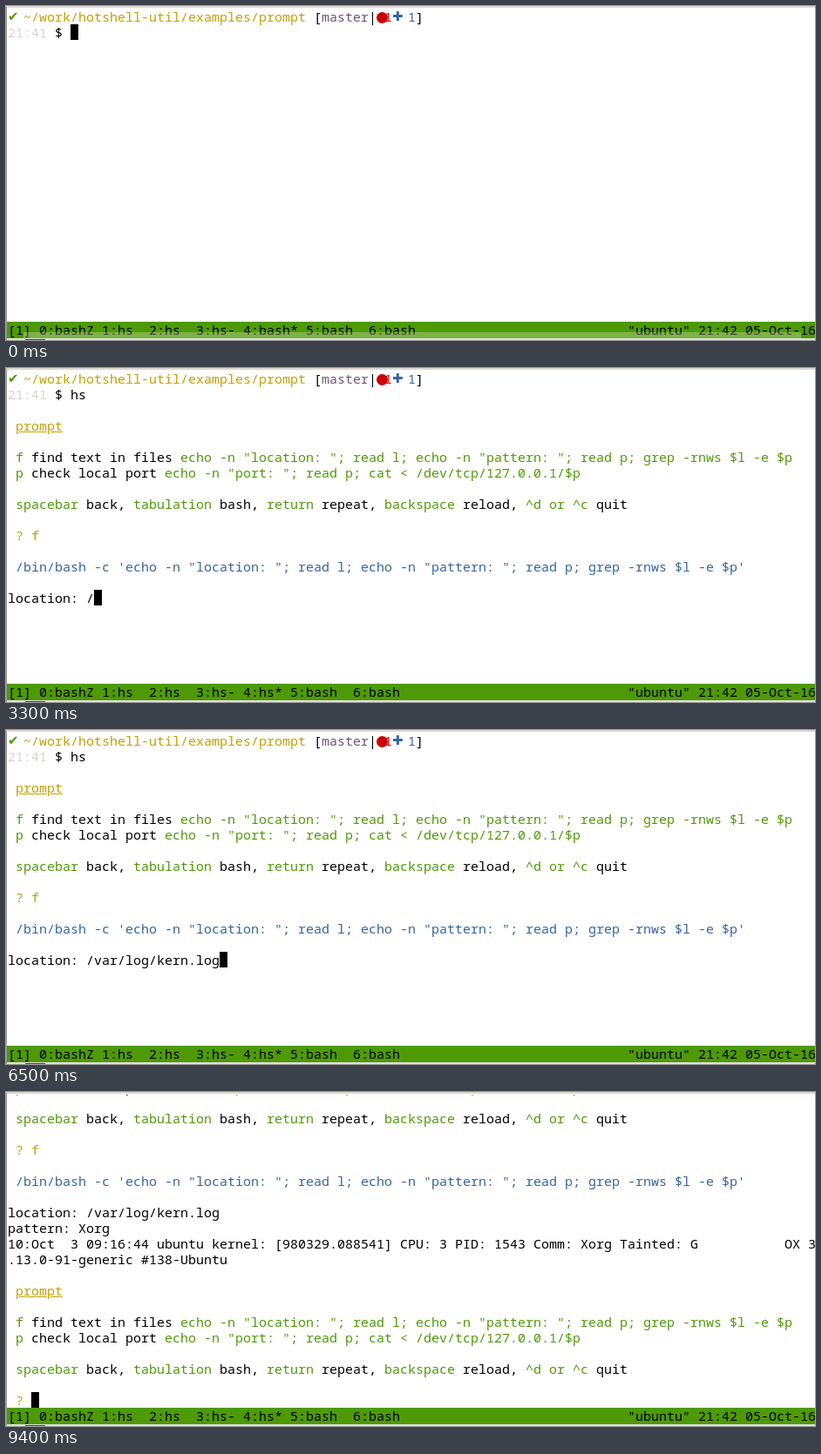
An HTML page for the animation above (9.5 s loop, 928 px wide and 384 px high).

```html
<!DOCTYPE html>
<html lang="en">
<head>
<meta charset="utf-8">
<title>Terminal menu</title>
<style>
  html, body { margin: 0; width: 100%; height: 100%; overflow: hidden; background: #fff; }
  #stage { position: relative; width: 928px; height: 384px; overflow: hidden; background: #fff;
    font: 15px/18px "Noto Sans Mono", "DejaVu Sans Mono", monospace; color: #000; }
  #stage div, #stage span { position: absolute; white-space: pre; }
  #view { left: 0; top: 3px; width: 928px; height: 360px; overflow: hidden; }
  #screen { left: 2px; top: 0; }
  #cursor { width: 9px; height: 18px; background: #000; }
  #bar { left: 1px; top: 363px; width: 927px; height: 19px; background: #4e9a06; overflow: hidden; }
  #bar span { left: 1px; top: 0; }
  #bar #clock { left: 712px; }
  #glow { left: 20px; top: 375px; width: 892px; height: 7px; background: #fff; }
  #top { left: 0; top: 0; width: 928px; height: 2px; background: #dcd7d1; }
  #left { left: 0; top: 1px; width: 1px; height: 383px; background: #99938c; }
  #bottom { left: 0; top: 382px; width: 928px; height: 2px; background: #e4e0dc; }
  #notch { left: 22px; top: 383px; width: 23px; height: 1px; background: #4a4742; }
  #dot { left: 423px; top: 4px; width: 13px; height: 13px; border-radius: 50%; background: #c00; }
  #stage .sym { font-family: "DejaVu Sans", sans-serif; }
  .g { color: #4e9a06; } .y { color: #c4a000; } .b { color: #3465a4; }
  .m { color: #75507b; } .r { color: #c00; } .w { color: #d3d7cf; }
  .u { text-decoration: underline; }
</style>
</head>
<body>
<div id="stage">
  <div id="view"><div id="screen"></div><div id="cursor"></div></div>
  <div id="bar"><span id="windows"></span><span id="clock">"ubuntu" 21:42 05-Oct-16</span></div>
  <div id="glow"></div>
  <div id="bottom"></div><div id="notch"></div><div id="top"></div><div id="left"></div>
</div>
<script>
const LOOP = 9500, CW = 9, RH = 18, SCROLL = 7;
const RUN = 1200, PICK = 2000, ASK = 6600, DONE = 7500;
const $ = id => document.getElementById(id);
const screen = $("screen"), cursor = $("cursor");
const parts = [];

// Each run is [column, classes, text].
function line(row, from, ...runs) {
  for (const [col, cls, text] of runs) {
    const el = document.createElement("span");
    el.className = cls;
    el.textContent = text;
    el.style.left = col * CW + "px";
    el.style.top = row * RH + "px";
    screen.append(el);
    parts.push({ el, from });
  }
}

const find = 'echo -n "location: "; read l; echo -n "pattern: "; read p; grep -rnws $l -e $p';
const port = 'echo -n "port: "; read p; cat < /dev/tcp/127.0.0.1/$p';

function menu(row, from) {
  line(row, from, [1, "y u", "prompt"]);
  line(row + 2, from, [1, "g", "f"], [3, "", "find text in files"], [22, "g", find]);
  line(row + 3, from, [1, "g", "p"], [3, "", "check local port"], [20, "g", port]);
  line(row + 5, from,
    [1, "g", "spacebar"], [10, "", "back,"], [16, "g", "tabulation"], [27, "", "bash,"],
    [33, "g", "return"], [40, "", "repeat,"], [48, "g", "backspace"], [58, "", "reload,"],
    [66, "g", "^d or ^c"], [75, "", "quit"]);
  line(row + 7, from, [1, "y", "?"]);
}

line(0, 0, [0, "g sym", "✔"], [2, "y", "~/work/hotshell-util/examples/prompt"],
  [39, "", "["], [40, "m", "master"], [46, "", "|"], [48, "r", "1"],
  [49, "b sym", "✚"], [51, "b", "1"], [52, "", "]"]);
const dot = document.createElement("div");
dot.id = "dot";
screen.append(dot);
line(1, 0, [0, "w", "21:41"], [6, "", "$"]);
menu(3, RUN);
line(12, PICK, [1, "b", "/bin/bash -c '" + find + "'"]);
line(14, PICK, [0, "", "location:"]);
line(15, ASK, [0, "", "pattern:"]);
line(16, DONE, [0, "", "10:Oct  3 09:16:44 ubuntu kernel: [980329.088541] CPU: 3 PID: 1543 Comm: Xorg Tainted: G"],
  [99, "", "OX 3"]);
line(17, DONE, [0, "", ".13.0-91-generic #138-Ubuntu"]);
menu(19, DONE);

// Input fields: cursor rests here from "from"; one key per time.
const inputs = [
  { row: 1, col: 8, from: 0, text: "hs", keys: [700, 900] },
  { row: 10, col: 3, from: RUN, text: "f", keys: [PICK], cls: "y" },
  { row: 14, col: 10, from: PICK, text: "/var/log/kern.log",
    keys: [3200, 3500, 3700, 3900, 4400, 4600, 4700, 4900, 5000, 5200, 5400, 5500, 5700, 6000, 6100, 6200, 6300] },
  { row: 15, col: 9, from: ASK, text: "Xorg", keys: [6900, 7000, 7100, 7200] },
  { row: 26, col: 3, from: DONE, text: "", keys: [] }
];
for (const f of inputs) {
  line(f.row, f.from, [f.col, f.cls || "", ""]);
  f.el = parts[parts.length - 1].el;
}

function draw(t) {
  for (const p of parts) p.el.style.visibility = t >= p.from ? "visible" : "hidden";
  const shift = t >= DONE ? SCROLL : 0;
  screen.style.top = -shift * RH + "px";
  for (const f of inputs) {
    const n = f.keys.filter(k => t >= k).length;
    f.el.textContent = f.text.slice(0, n);
    if (t >= f.from) {
      cursor.style.left = 2 + (f.col + n) * CW + "px";
      cursor.style.top = (f.row - shift) * RH + "px";
    }
  }
  const job = t >= RUN + 200 ? "hs" : "bash";
  $("windows").textContent = "[1] 0:bashZ 1:hs  2:hs  3:hs- 4:" + job + "* 5:bash  6:bash";
  $("glow").style.opacity = t < 100 ? 0.25 : 0;
}

function tick() {
  const now = performance.now();
  draw(now % LOOP);
  requestAnimationFrame(tick);
}
tick();
</script>
</body>
</html>
```
